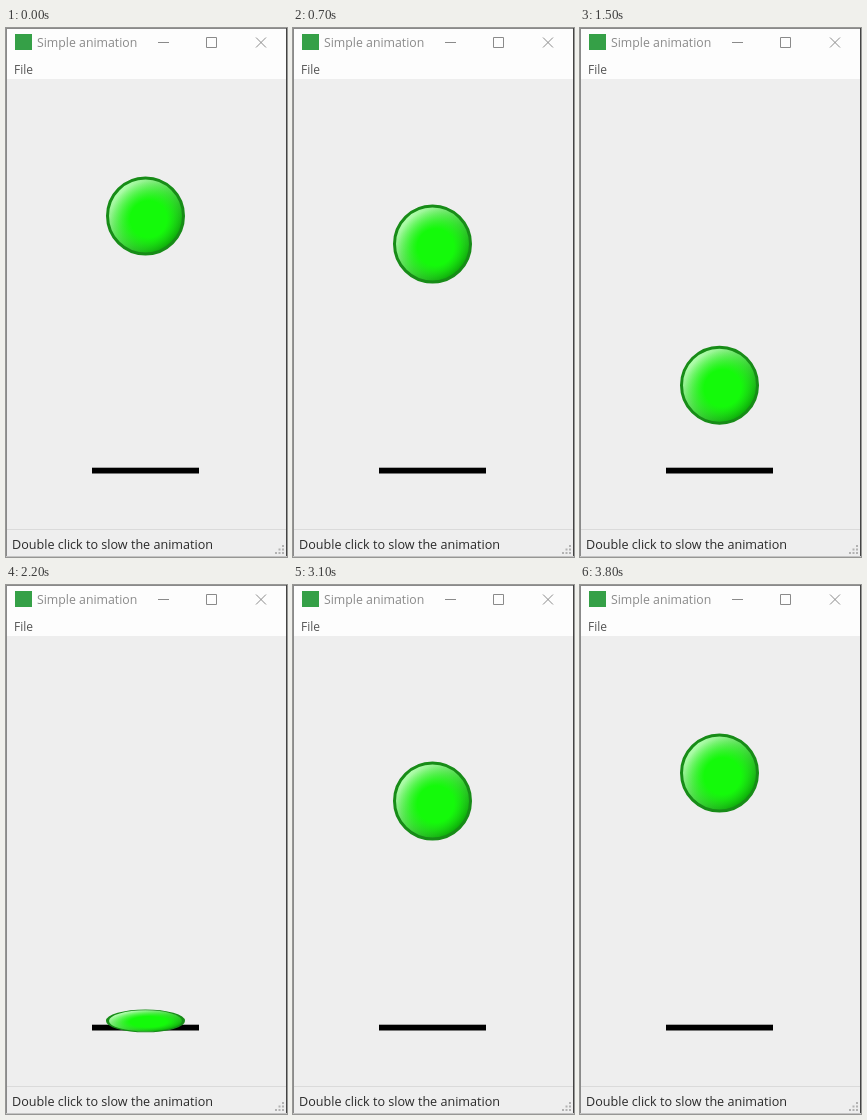
Recreate the animation shown at these times as an HTML page. Size 281 px wide and 529 px high, loop 4100 ms.

```html
<!DOCTYPE html>
<html lang="en">
<head>
<meta charset="utf-8">
<title>Simple animation</title>
<style>
  html, body { margin: 0; width: 100%; height: 100%; overflow: hidden; background: #eee; }
  svg { display: block; width: 281px; height: 529px; }
  text { font-family: "Open Sans", "Noto Sans", sans-serif; }
  .button { fill: none; stroke: #8a8a8a; stroke-width: 1; }
</style>
</head>
<body>
<svg viewBox="0 0 281 529" xmlns="http://www.w3.org/2000/svg">
  <defs>
    <linearGradient id="shade" x1="0.15" y1="0.15" x2="0.85" y2="0.85">
      <stop offset="0" stop-color="#b4ffb0"/>
      <stop offset="0.5" stop-color="#50d84c"/>
      <stop offset="1" stop-color="#078a06"/>
    </linearGradient>
    <radialGradient id="core" cx="0.54" cy="0.54" r="0.5">
      <stop offset="0" stop-color="#14fa0a"/>
      <stop offset="0.48" stop-color="#14fa0a"/>
      <stop offset="1" stop-color="#14fa0a" stop-opacity="0"/>
    </radialGradient>
  </defs>

  <rect width="281" height="529" fill="#eee"/>
  <rect width="281" height="51" fill="#fdfdfd"/>
  <rect x="9" y="6" width="17" height="16" fill="#35a047"/>
  <text x="31" y="19" font-size="12.3" fill="#8a8a8a">Simple animation</text>
  <g class="button">
    <path d="M152 14.5h11M200.5 9.5h10v10h-10zM250 9.5l10 10M260 9.5l-10 10"/>
  </g>
  <text x="8" y="46" font-size="12" fill="#555">File</text>

  <rect x="1" y="501" width="279" height="1" fill="#dadada"/>
  <text x="6" y="521" font-size="12.6" fill="#2a2a2a">Double click to slow the animation</text>
  <g id="grip" fill="#b2b2b2"></g>

  <rect x="86" y="439.7" width="107" height="5.8" fill="#000"/>
  <g id="ball">
    <circle r="38" fill="url(#shade)"/>
    <circle r="38" fill="url(#core)" stroke="#178c17" stroke-width="3"/>
  </g>

  <rect width="281" height="1" fill="#8a8a8a"/>
  <rect width="1" height="529" fill="#8a8a8a"/>
  <rect x="280" width="1" height="529" fill="#444"/>
  <rect y="528" width="281" height="1" fill="#c4c4c4"/>
</svg>
<script>
const LOOP = 4100, TICK = 100;
const APEX = 148.5, SIZE = 79, FLOOR = 447.3;

// [tick, speed]: the drop grows with the sum of the speeds so far
const KEYS = [[0, 0], [7, 7], [15, 17.9], [20, 23], [23, 23], [26, 20], [31, 7], [38, 0], [41, 0]];
const ball = document.getElementById('ball');
const grip = document.getElementById('grip');

for (let row = 0; row < 3; row++) {
  for (let col = 0; col <= row; col++) {
    const dot = document.createElementNS('http://www.w3.org/2000/svg', 'rect');
    dot.setAttribute('x', 276 - col * 3.5);
    dot.setAttribute('y', 517 + row * 3.5);
    dot.setAttribute('width', 2);
    dot.setAttribute('height', 2);
    grip.append(dot);
  }
}

function speedAt(tick) {
  const i = KEYS.findIndex(key => key[0] > tick);
  const [t0, v0] = KEYS[i - 1], [t1, v1] = KEYS[i];
  return v0 + (v1 - v0) * (tick - t0) / (t1 - t0);
}

function draw(ms) {
  const n = speedAt(Math.floor(ms % LOOP / TICK));
  const top = APEX + n * (n + 1) / 2;
  const height = Math.min(SIZE, FLOOR - top);
  ball.setAttribute('transform', `translate(139.5 ${top + height / 2}) scale(1 ${height / SIZE})`);
}

const start = performance.now();
function frame() {
  draw(performance.now() - start);
  requestAnimationFrame(frame);
}
frame();
</script>
</body>
</html>
```
